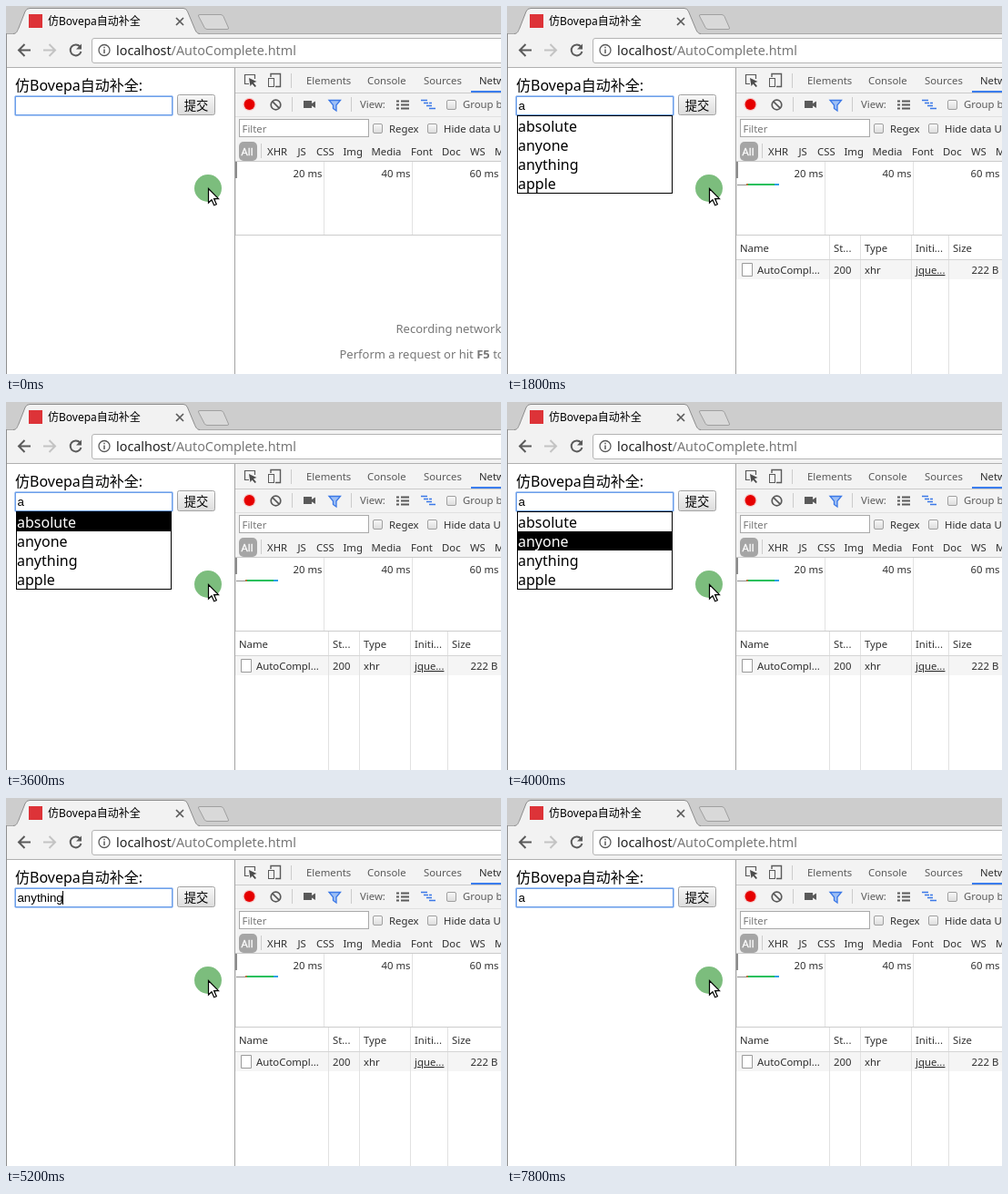
Write an HTML page that moves like this. It is 544 px wide and 404 px high and loops after 8 s.

```html
<!DOCTYPE html>
<html lang="zh-CN">
<head>
<meta charset="utf-8">
<title>Autocomplete demo</title>
<style>
html, body { margin: 0; width: 100%; height: 100%; overflow: hidden; background: #fff; }
svg { display: block; width: 544px; height: 404px; }
text { font-family: "Noto Sans", "Noto Sans CJK SC", "Noto Sans CJK", sans-serif; white-space: pre; }
rect { shape-rendering: crispEdges; }
.soft { shape-rendering: auto; }
.page { font-size: 16px; }
.dev { font-size: 11.35px; fill: #303030; }
.tabs { fill: #5a5a5a; }
.big { font-size: 13px; fill: #777; }
.arial { font: 13.333px "Liberation Sans", Arial, sans-serif; }
.line { fill: none; stroke: #5a5a5a; }
</style>
</head>
<body>
<svg viewBox="0 0 544 404">
  <defs>
    <linearGradient id="btn" x2="0" y2="1"><stop stop-color="#f8f8f8"/><stop offset="1" stop-color="#dcdcdc"/></linearGradient>
  </defs>

  <!-- browser frame -->
  <rect width="544" height="31" fill="#cdcdcd"/>
  <rect y="30" width="544" height="38" fill="#f2f2f2"/>
  <rect y="30" width="544" height="1" fill="#a9a9a9"/>
  <path d="M8 31C12 30 12 28 14 24L21 6Q22.500 2.500 26 2.500H195Q198 2.500 199.500 6L207 24C209 29 210 30 213 31Z" fill="#f2f2f2"/>
  <path d="M8 30.500C12 30 12 28 14 24L21 6Q22.500 2.500 26 2.500H195Q198 2.500 199.500 6L207 24C209 29 210 30 213 30.500" fill="none" stroke="#8c8c8c"/>
  <path d="M213 9.500H236Q238 9.500 239 11.500L244.500 24Q245 25.500 243 25.500H221Q219 25.500 218 23.500L211.500 11Q211 9.500 213 9.500Z" fill="#d9d9d9" stroke="#a0a0a0"/>
  <rect x="25" y="9" width="15" height="15" fill="#dd3338"/>
  <text x="46" y="21" font-size="12">仿Bovepa自动补全</text>
  <path d="M187 13l8 8m0-8l-8 8" class="line" stroke-width="1.700"/>

  <path d="M27 48.500H14.500M20.500 42l-6.500 6.500 6.500 6.500" class="line" stroke-width="2"/>
  <path d="M41 48.500H53.500M47.500 42l6.500 6.500-6.500 6.500" class="line" style="stroke:#c3c3c3" stroke-width="2"/>
  <path d="M81.300 44.500A6 6 0 1 0 82.500 50" class="line" stroke-width="2"/>
  <path d="M83 41.500V47.500H77Z" fill="#5a5a5a"/>
  <path d="M545 35.500H97Q94.500 35.500 94.500 38V60Q94.500 62.500 97 62.500H545" fill="#fff" stroke="#b4b4b4"/>
  <circle cx="108" cy="48.500" r="6" class="line" stroke-width="1.300"/>
  <path d="M108 47.500V52M108 44.700V46.200" class="line" stroke-width="1.500"/>
  <text x="121" y="54" font-size="14.350" fill="#222">localhost<tspan fill="#777">/AutoComplete.html</tspan></text>
  <rect y="67" width="544" height="1" fill="#b0b0b0"/>

  <!-- page -->
  <rect y="68" width="252" height="336" fill="#fff"/>
  <rect y="30" width="1" height="374" fill="#8e8e8e"/>
  <text x="10" y="93" class="page">仿Bovepa自动补全:</text>
  <rect x="9.500" y="98.500" width="174" height="22" rx="1.500" fill="#fff" stroke="#a9c7f3" class="soft"/>
  <rect x="10.500" y="99.500" width="172" height="20" fill="#fff" stroke="#6c9fea" class="soft"/>
  <rect x="188.500" y="97.500" width="41" height="22" rx="2" fill="url(#btn)" stroke="#a3a3a3" class="soft"/>
  <text x="195.700" y="114" font-size="13.333">提交</text>
  <text id="typed" x="12.400" y="114" class="arial"></text>
  <rect id="caret" y="102" width="1" height="15"/>
  <g id="list"><rect x="11.500" y="120.500" width="170" height="85" fill="#fff" stroke="#000"/></g>

  <!-- developer tools -->
  <rect x="252" y="68" width="292" height="103" fill="#f3f3f3"/>
  <rect x="252" y="171" width="292" height="233" fill="#fff"/>
  <g id="rules"></g>
  <rect x="511" y="93" width="33" height="2" fill="#3b7ded"/>

  <path d="M273.500 80V75.500H262.500V85.500H267" class="line" stroke-width="1.200"/>
  <path d="M267 79L275.500 83 272 84.300 275 88 273.500 89 270.500 85.500 268.500 88Z" fill="#4c4c4c"/>
  <path d="M291 78V74.500H301.500V88.500H296" class="line" stroke-width="1.400"/>
  <rect x="288.500" y="79.500" width="6" height="9" class="line"/>
  <circle cx="267.500" cy="108" r="7.200" fill="#f5c9c9"/>
  <circle cx="267.500" cy="108" r="5.900" fill="#e60000"/>
  <circle cx="296.500" cy="108.500" r="5.300" class="line" stroke-width="1.700"/>
  <path d="M292.800 104.800l7.400 7.400" class="line" stroke-width="1.700"/>
  <path d="M327 104H336V107L340 104.500V112L336 109.500V112H327Z" fill="#5a5a5a"/>
  <path d="M355 103.500H367.500L363 108.700V115L359.500 112.500V108.700Z" fill="#9fc0f5" stroke="#3b78e7" stroke-width="1.300"/>
  <path d="M429 104.500h3m2 0h9M429 108.500h3m2 0h9M429 112.500h3m2 0h9" class="line" stroke-width="2.200"/>
  <path d="M456 103.500h7M459 106.500h5m1 0h3M462 109.500h6M465 112.500h7" fill="none" stroke="#3b78e7" stroke-width="1.700"/>
  <g id="boxes"></g>
  <rect x="256.500" y="124.500" width="142" height="19" fill="#fff" stroke="#a9a9a9" class="soft"/>
  <rect x="256" y="149" width="20" height="21" rx="5" fill="#a5a5a5" class="soft"/>
  <text x="258.500" y="164" class="dev" style="fill:#fff" stroke="#fff" stroke-width=".3">All</text>
  <g id="labels"></g>

  <g id="empty">
    <text x="428.500" y="359" class="big">Recording network activity…</text>
    <text x="366.500" y="387" class="big">Perform a request or hit <tspan font-weight="700">F5</tspan> to record</text>
  </g>
  <g id="loaded">
    <rect x="253" y="196" width="10" height="1" fill="#8f8f8f"/>
    <rect x="263" y="195" width="2" height="2" fill="#b5763a"/>
    <rect x="265" y="195" width="29" height="2" fill="#1ec05c"/>
    <rect x="294" y="195" width="5" height="2" fill="#2d9fe8"/>
    <rect x="252" y="279" width="292" height="21" fill="#f5f5f5"/>
    <path d="M258.500 282.500H269.500V296.500H258.500Z" fill="#fff" stroke="#9a9a9a"/>
  </g>
  <rect x="251" y="68" width="1" height="336" fill="#a3a3a3"/>

  <!-- pointer -->
  <circle cx="222" cy="200" r="15" fill="#7cbd7d"/>
  <path d="M222.500 200.500V216L226 212.700 228.700 218.800 231.300 217.700 228.600 211.600H233.500Z" fill="#fff" stroke="#000" stroke-width="1.200"/>
</svg>
<script>
const $ = id => document.getElementById(id);
const add = (parent, tag, attrs, text = '') => {
  const el = document.createElementNS('http://www.w3.org/2000/svg', tag);
  for (const k in attrs) el.setAttribute(k, attrs[k]);
  el.textContent = text;
  return parent.appendChild(el);
};
const rule = (parent, x, y, width, height, fill) => add(parent, 'rect', { x, y, width, height, fill });
const row = (parent, y, cls, items) => {
  for (const [x, s] of items) add(parent, 'text', { x, y, class: cls }, s);
};

const rules = $('rules'), labels = $('labels'), loaded = $('loaded');
for (const y of [95, 121, 170]) rule(rules, 252, y, 292, 1, y == 121 ? '#e0e0e0' : '#cacaca');
rule(rules, 252, 251, 292, 1, '#cccccc');
for (const x of [252, 349, 446]) rule(rules, x, 171, 1, 80, '#e2e2e2');
rule(rules, 252, 171, 2, 18, '#8c8c8c');
for (const [x, y] of [[313, 74], [314, 100], [379, 100], [280, 151]]) rule(rules, x, y, 1, 16, '#cccccc');
for (const [x, y] of [[484, 103], [403, 129], [463, 129]])
  add($('boxes'), 'rect', { x: x + .5, y: y + .5, width: 10, height: 10, rx: 1.5, fill: 'url(#btn)', stroke: '#a0a0a0', class: 'soft' });

row(labels, 86, 'dev tabs', [[330, 'Elements'], [397, 'Console'], [459, 'Sources']]);
row(labels, 86, 'dev', [[520, 'Network']]);
row(labels, 112, 'dev tabs', [[389, 'View:'], [502, 'Group by frame']]);
row(labels, 139, 'dev', [[421, 'Regex'], [481, 'Hide data URLs']]);
add(labels, 'text', { x: 259.5, y: 139, class: 'dev', style: 'fill:#777' }, 'Filter');
row(labels, 164, 'dev', [[287, 'XHR'], [320.5, 'JS'], [341, 'CSS'], [370.5, 'Img'], [401.5, 'Media'],
  [445, 'Font'], [479, 'Doc'], [510, 'WS'], [537, 'Manifest']]);
row(labels, 188, 'dev', [[315.5, '20 ms'], [412.5, '40 ms'], [509.5, '60 ms']]);

for (const x of [354, 388, 444, 485]) rule(loaded, x, 252, 1, 152, '#e1e1e1');
rule(loaded, 252, 278, 292, 1, '#d5d5d5');
row(loaded, 270, 'dev', [[256, 'Name'], [359, 'St...'], [393, 'Type'], [449, 'Initi...'], [490, 'Size']]);
row(loaded, 294, 'dev', [[275, 'AutoCompl...'], [359, '200'], [393, 'xhr'], [510.5, '222 B']]);
add(loaded, 'text', { x: 449, y: 294, class: 'dev', 'text-decoration': 'underline' }, 'jque...');

const options = ['absolute', 'anyone', 'anything', 'apple'].map((word, i) => ({
  bar: rule($('list'), 12, 121 + 21 * i, 169, 21, '#000'),
  label: add($('list'), 'text', { x: 12, y: 138 + 21 * i, class: 'page' }, word)
}));

const LOOP = 8000, LOAD = 1800;
// start time, input text, caret on, chosen option (-1: none, absent: list closed)
const steps = [
  [0, '', 0], [600, '', 1], [1000, 'a', 1], [1600, 'a', 0],
  [1800, 'a', 0, -1], [2000, 'a', 1, -1], [2600, 'a', 0, -1], [3200, 'a', 1, -1],
  [3400, 'a', 1, 0], [3600, 'a', 0, 0], [4000, 'a', 0, 1], [4200, 'a', 1, 1],
  [4400, 'a', 1, 2], [4800, 'a', 0, 2],
  [5200, 'anything', 1], [5800, 'anything', 0], [6200, 'anythin', 1],
  [6800, 'any', 0], [7000, 'an', 0], [7400, 'a', 1], [7800, 'a', 0]
];
const show = (el, on) => el.setAttribute('visibility', on ? 'visible' : 'hidden');

let current;
function draw(t) {
  const step = steps.findLast(s => s[0] <= t);
  if (step === current) return;
  current = step;
  const [, text, caret, choice] = step;
  $('typed').textContent = text;
  const width = text ? $('typed').getComputedTextLength() : 0;
  $('caret').setAttribute('x', Math.round(12 + width));
  show($('caret'), caret);
  $('list').style.display = choice === undefined ? 'none' : '';
  options.forEach(({ bar, label }, i) => {
    bar.style.display = i === choice ? '' : 'none';
    label.setAttribute('fill', i === choice ? '#fff' : '#000');
  });
  show($('loaded'), t >= LOAD);
  show($('empty'), t < LOAD);
}

const start = performance.now();
function tick() {
  draw((performance.now() - start) % LOOP);
  requestAnimationFrame(tick);
}
tick();
</script>
</body>
</html>
```
